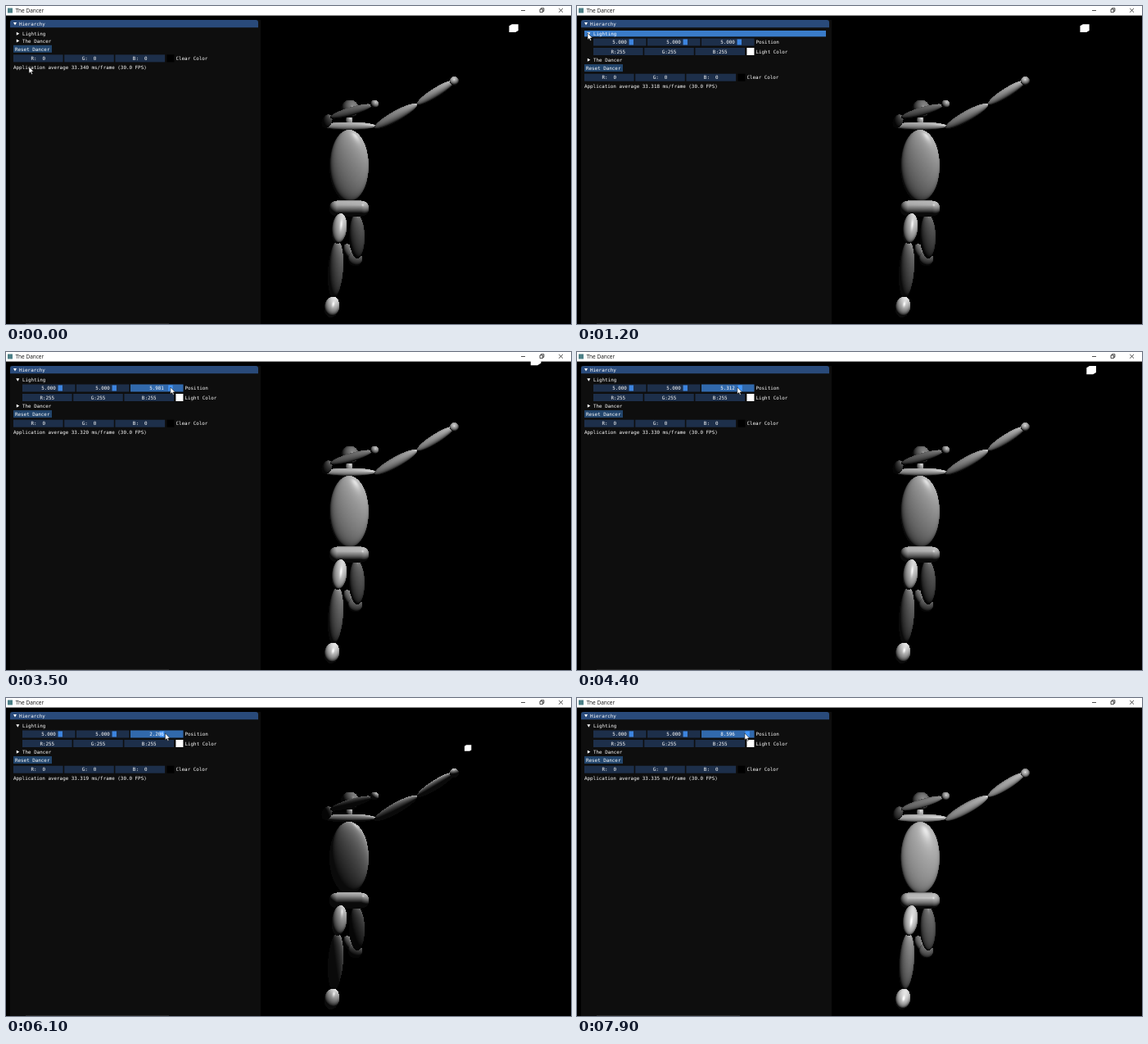
Recreate the animation shown at these times as an HTML page with a canvas. Size 690 by 388 pixels, loop 8 s.

```html
<!DOCTYPE html>
<html lang="en">
<head>
<meta charset="utf-8">
<title>The Dancer</title>
<style>
  html, body { margin: 0; width: 100%; height: 100%; overflow: hidden; background: #000; }
  canvas { display: block; }
</style>
</head>
<body>
<canvas id="stage" width="690" height="388"></canvas>
<script>
const ctx = document.getElementById('stage').getContext('2d');
const LOOP = 8000, STEP = 100;
const OPEN_AT = 1100, DRAG_AT = 2900;
const NAME = 'Dancer';

// Scene units: camera on the z axis, lamp at (5, 5, z).
const CX = 345, CY = 194, CAM = 15.95, UNIT = 37.8;

const COLOR = {
  panel: '#0e0e0e', title: '#294a7a', frame: '#1d2f4a', active: '#3169ac',
  button: '#22456c', grab: '#3d85e0', grabActive: '#4296fa', header: '#3a7cc9'
};

// Key points: time, then value(s); eased in between.
const LAMP_Z = [
  [3000, 5], [3400, 6], [4400, 5.312], [4500, 4.1], [5100, -1],
  [6100, 2.206], [6300, 5], [7000, 1.926], [7700, 9], [7900, 8.596], [8000, 7.4]
];
const POINTER = [[300, 28, 74], [900, 13, 33], [1300, 13, 33], [2300, 172, 66], [2600, 172, 66], [2900, 198, 43]];

function sample(keys, t, i = 1) {
  const n = keys.findIndex(k => k[0] > t);
  if (n < 0) return keys[keys.length - 1][i];
  if (n === 0) return keys[0][i];
  const a = keys[n - 1], b = keys[n], u = (t - a[0]) / (b[0] - a[0]);
  return a[i] + (b[i] - a[i]) * u * u * (3 - 2 * u);
}

const clamp = (v, lo, hi) => Math.max(lo, Math.min(hi, v));

// A spheroid between two joints; z points to the viewer.
function limb(a, b, r, options) {
  const v = b.map((c, i) => c - a[i]), length = Math.hypot(...v);
  return {
    at: a.map((c, i) => (c + b[i]) / 2), dir: v.map(c => c / length),
    h: length / 2, r, core: 0, flat: 1.4, albedo: .75, ...options
  };
}

const ball = ([x, y, z], r, options) => limb([x - r, y, z], [x + r, y, z], r, { flat: 1, ...options });

const chain = (joints, radii, options) =>
  radii.map((r, i) => limb(joints[i], joints[i + 1], r, options));

const R_HAND = [547.5, 91.5, 60], L_HAND = [450, 119.5, 42];

// Back to front
const FIGURE = [
  ...chain([[415, 291, -36], [424, 309, -20], [429, 308, -8], [428, 254, 0]], [6, 9, 9.5], { albedo: .5 }),
  limb([419, 134, 0], [419, 146, 0], 4.5),
  ball([420, 125.5, 0], 11, { albedo: .5 }),
  limb([386, 146.5, 0], [452, 146.5, 0], 5),
  limb([389, 147, 0], [395, 134, 18], 6, { albedo: .4 }),
  limb([396, 136, 18], [447, 121, 42], 5.2, { albedo: .6 }),
  ball(L_HAND, 5, { albedo: .7 }),
  ...chain([[450, 149, 0], [502, 120, 30], R_HAND], [6.5, 5.8]),
  ball(R_HAND, 5.5),
  limb([419, 151, 0], [419, 239, 0], 24, { flat: 2.8 }),
  ball([419, 247, 0], 9.5, { core: 15 }),
  limb([405, 287, 25], [400, 356, 8], 9.3),
  limb([409, 254, 0], [405, 289, 28], 9.2, { albedo: .85 }),
  limb([400, 357, 8], [396, 377.5, 36], 9.2, { albedo: .9 })
];

const BOX = { x: 375, y: 80, w: 190, h: 306 };
const layer = document.createElement('canvas');
layer.width = BOX.w;
layer.height = BOX.h;
const layerCtx = layer.getContext('2d');

// Brightness of a surface point; normals have y up.
function shade(x, y, z, nx, ny, nz, albedo, lampZ) {
  let lx = 5 - (x - CX) / UNIT, ly = 5 - (CY - y) / UNIT, lz = lampZ - z / UNIT;
  const ll = Math.hypot(lx, ly, lz);
  lx /= ll; ly /= ll; lz /= ll;
  const diffuse = Math.max(0, nx * lx + ny * ly + nz * lz);
  const half = (nx * lx + ny * ly + nz * (lz + 1)) / Math.hypot(lx, ly, lz + 1);
  const gloss = diffuse > 0 ? Math.pow(Math.max(0, half), 90) : 0;
  return 255 * albedo * (.05 + .95 * diffuse + .25 * gloss);
}

function drawSpheroid(img, lampZ, { at: [cx, cy, cz], dir: [dx, dy, dz], h, r, core, flat, albedo }) {
  const k = 1 - r * r / (h * h), A = 1 - k * dz * dz, reach = Math.max(h, r) + core;
  for (let py = Math.floor(cy - reach); py <= cy + reach; py++) {
    for (let px = Math.floor(cx - reach); px <= cx + reach; px++) {
      let x = px + .5 - cx, y = py + .5 - cy;
      const slide = clamp(x * dx + y * dy, -core, core);
      x -= slide * dx;
      y -= slide * dy;
      const s = x * dx + y * dy, B = -k * s * dz;
      const disc = B * B - A * (x * x + y * y - k * s * s - r * r);
      if (disc < 0) continue;
      const z = (Math.sqrt(disc) - B) / A, q = k * (s + z * dz);
      const nx = x - q * dx, ny = y - q * dy, nz = (z - q * dz) * flat, n = Math.hypot(nx, ny, nz);
      const g = shade(px, py, cz + z, nx / n, -ny / n, nz / n, albedo, lampZ);
      const i = ((py - BOX.y) * BOX.w + px - BOX.x) * 4;
      img.data.fill(g, i, i + 3);
      img.data[i + 3] = 255;
    }
  }
}

let shownZ = null;
function drawFigure(lampZ) {
  if (lampZ !== shownZ) {
    const img = layerCtx.createImageData(BOX.w, BOX.h);
    FIGURE.forEach(part => drawSpheroid(img, lampZ, part));
    layerCtx.putImageData(img, 0, 0);
    shownZ = lampZ;
  }
  ctx.drawImage(layer, BOX.x, BOX.y);
}

function poly(points, fill) {
  ctx.beginPath();
  points.forEach(([x, y]) => ctx.lineTo(x, y));
  ctx.closePath();
  ctx.fillStyle = fill;
  ctx.fill();
}

// Outline of a small cube in perspective.
function drawLamp(z) {
  const S = .07, focal = 55 * (CAM - 5);
  const corner = (sx, sy, sz) => {
    const f = focal / (CAM - z - sz * S);
    return [CX + (5 + sx * S) * f, CY - (3.035 + sy * S) * f];
  };
  poly([corner(-1, 1, 1), corner(1, 1, 1), corner(1, -1, 1),
        corner(1, -1, -1), corner(-1, -1, -1), corner(-1, 1, -1)], '#fff');
}

function rect(x, y, w, h, fill) {
  ctx.fillStyle = fill;
  ctx.fillRect(x, y, w, h);
}

function label(str, x, y, align = 'left') {
  ctx.font = '5.88px "DejaVu Sans Mono", monospace';
  ctx.textAlign = align;
  ctx.fillStyle = '#fff';
  ctx.fillText(str, x, y + 2.1);
}

function arrow(x, y, down) {
  poly(down ? [[x - 2, y - 1.6], [x + 2, y - 1.6], [x, y + 1.9]]
            : [[x - 1.5, y - 2], [x + 2, y], [x - 1.5, y + 2]], '#fff');
}

function colorRow(x, y, value, name, swatch) {
  [...'RGB'].forEach((c, i) => {
    const fx = x + i * 62.2;
    rect(fx, y, 60.6, 9, COLOR.frame);
    label(c + ':' + value, fx + 30.3, y + 4.6, 'center');
  });
  rect(x + 187.4, y, 9, 9, swatch);
  label(name, x + 198.5, y + 4.6);
}

const grabX = (x, v) => x + 5 + 55 * (v + 10) / 20;

function slider(x, v, dragging) {
  rect(x, 39.5, 64.5, 9, dragging ? COLOR.active : COLOR.frame);
  rect(grabX(x, v) - 2.7, 40.5, 5.4, 7, dragging ? COLOR.grabActive : COLOR.grab);
  label(v.toFixed(3), x + 32, 44.1, 'center');
}

function drawPanel(t, pointer, lampZ) {
  const open = t >= OPEN_AT, y = open ? 65.7 : 42.4;
  rect(5, 17, 306, 371, COLOR.panel);
  ctx.fillStyle = COLOR.title;
  ctx.beginPath();
  ctx.roundRect(5, 17, 303, 9.3, [3, 3, 0, 0]);
  ctx.fill();
  arrow(11, 21.6, true);
  label('Hierarchy', 16, 21.6);

  if (Math.abs(pointer.y - 33.8) < 3.8 && t < DRAG_AT) rect(9, 30, 295, 7.4, COLOR.header);
  arrow(14.3, 33.8, open);
  label('Lighting', 20, 33.8);
  if (open) {
    [5, 5, lampZ].forEach((v, i) => slider(20 + 66 * i, v, i === 2 && t >= DRAG_AT));
    label('Position', 218.5, 44.1);
    colorRow(20, 51, '255', 'Light Color', '#fff');
  }

  arrow(14.3, y, false);
  label('The ' + NAME, 20, y);
  rect(9, y + 5.4, 47, 9, COLOR.button);
  label('Reset ' + NAME, 11, y + 10);
  colorRow(9, y + 17, '  0', 'Clear Color', '#000');
  const ms = 33.329 + .011 * Math.cos(2 * Math.PI * t / 2500);
  label(`Application average ${ms.toFixed(3)} ms/frame (${(1000 / ms).toFixed(1)} FPS)`, 9, y + 32);
}

function drawTitleBar() {
  rect(0, 0, 690, 11.6, '#fff');
  rect(2, 2.5, 6, 6, '#4b7f86');
  ctx.font = '6.5px "Open Sans", sans-serif';
  ctx.textAlign = 'left';
  ctx.fillStyle = '#111';
  ctx.fillText('The ' + NAME, 11.5, 8.2);
  ctx.strokeStyle = '#222';
  ctx.lineWidth = .8;
  ctx.beginPath();
  ctx.moveTo(629, 5.5); ctx.lineTo(634, 5.5);
  ctx.rect(652, 4, 3.6, 3.6);
  ctx.moveTo(653.3, 4); ctx.lineTo(653.3, 2.7);
  ctx.lineTo(656.9, 2.7); ctx.lineTo(656.9, 6.3); ctx.lineTo(655.6, 6.3);
  ctx.moveTo(675.2, 2.9); ctx.lineTo(680, 7.7);
  ctx.moveTo(680, 2.9); ctx.lineTo(675.2, 7.7);
  ctx.stroke();
}

function drawPointer({ x, y }) {
  const shape = [[0, 0], [0, 8.2], [1.9, 6.5], [3.2, 9.4], [4.5, 8.8], [3.3, 6], [5.8, 6]];
  poly(shape.map(([a, b]) => [x + a, y + b]), '#fff');
  ctx.strokeStyle = '#000';
  ctx.lineWidth = .5;
  ctx.stroke();
}

function pointerAt(t) {
  // While dragging, the pointer runs one step ahead of the slider.
  if (t >= DRAG_AT) return { x: grabX(152, sample(LAMP_Z, t + STEP)), y: 43 };
  return { x: sample(POINTER, t, 1), y: sample(POINTER, t, 2) };
}

function draw(t) {
  const z = sample(LAMP_Z, t), pointer = pointerAt(t);
  rect(0, 0, 690, 388, '#000');
  drawFigure(z);
  drawLamp(z);
  drawPanel(t, pointer, z);
  rect(24, 387, 175, 1, '#2a2a2a');
  drawTitleBar();
  drawPointer(pointer);
}

let last = -1;
function tick() {
  const t = Math.floor(performance.now() % LOOP / STEP) * STEP;
  if (t !== last) draw(last = t);
  requestAnimationFrame(tick);
}
tick();
</script>
</body>
</html>
```
